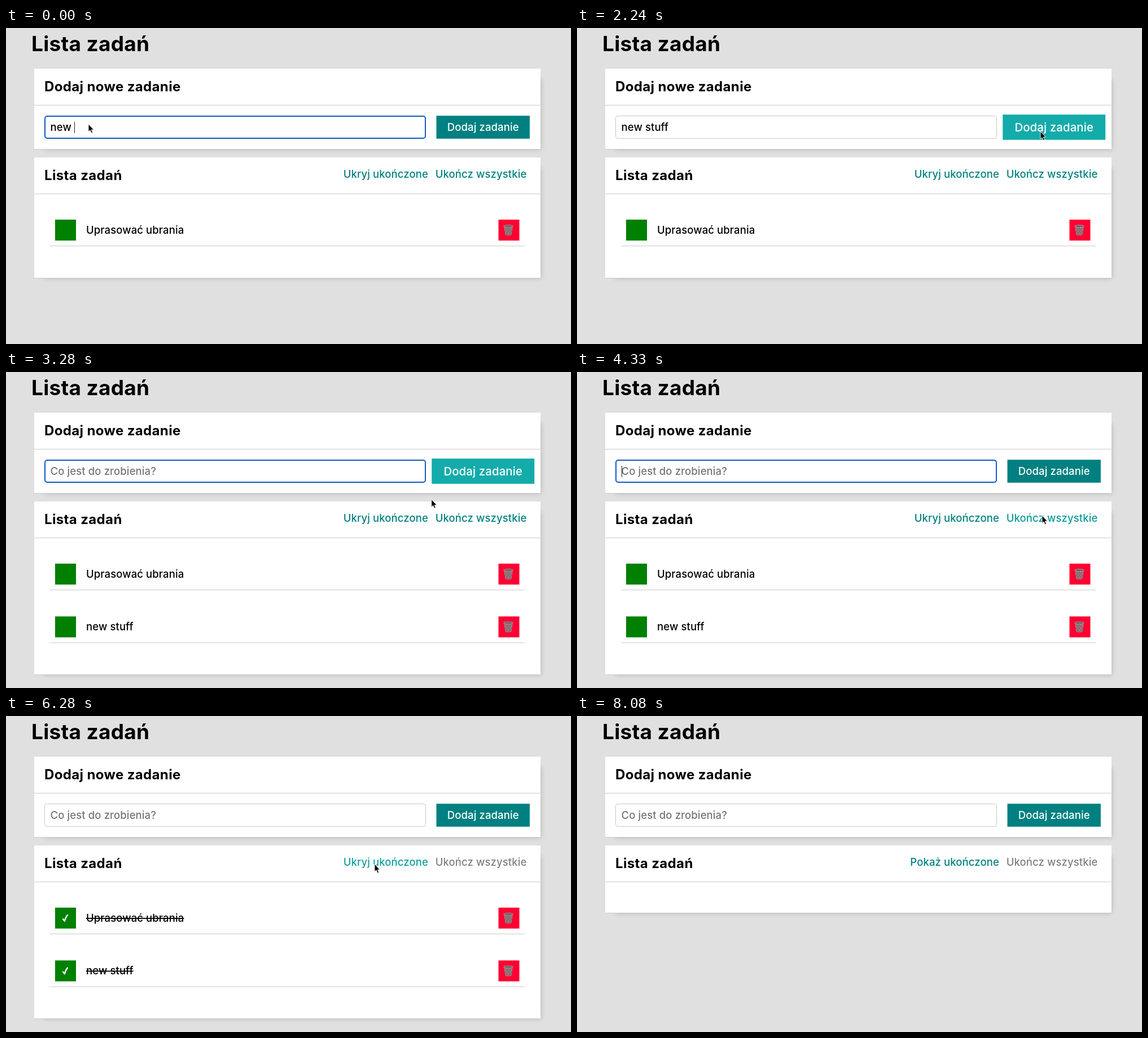
An HTML page for the animation above (8.38 s loop, 1001 px wide and 559 px high).

```html
<!DOCTYPE html>
<html lang="pl">
<head>
<meta charset="utf-8">
<title>Lista zadań</title>
<style>
  html, body { margin: 0; width: 100%; height: 100%; overflow: hidden; background: #e0e0e0; }
  .card {
    position: absolute; left: 50px; width: 896.5px; background: #fff;
    box-shadow: 0 1px 0 #c9c9c9, 9px 9px 9px -9px rgba(0, 0, 0, .22);
  }
  #form { top: 72px; height: 142px; }
  #list { top: 229px; }
  svg { position: absolute; left: 0; top: 0; }
  text { font: 500 18.5px Inter, sans-serif; letter-spacing: .006em; white-space: pre; }
  .title, .heading { font-weight: 700; letter-spacing: .015em; }
  .title { font-size: 37px; letter-spacing: .008em; }
  .heading { font-size: 24px; }
  .link { text-anchor: end; }
  .done { text-decoration: line-through; }
  .rule { stroke: #ccc; }
</style>
</head>
<body>
<div class="card" id="form"></div>
<div class="card" id="list"></div>
<svg width="1001" height="559">
  <defs>
    <g id="trash">
      <rect x="872.5" y="339" width="37" height="37" fill="#ff0033"/>
      <path d="M882 351h16l-2.4 15q-5.600 2.500-11.200 0z" fill="#a5747a"/>
      <path d="M884 353l11 13M888 352l8 9M883 358l7 9M896 353l-11 13M892 352l-8 9M897 358l-7 9"
            stroke="#6d6668" stroke-width=".9"/>
      <ellipse cx="890" cy="350.500" rx="8.500" ry="1.900" fill="#685c5e" stroke="#a69a9b"/>
    </g>
    <path id="check" d="M100.500 358.500l3.300 4.300q1.700-7 5.700-11.300" fill="none"
          stroke="#fff" stroke-width="2.300" stroke-linejoin="round"/>
  </defs>
  <text class="title" x="45" y="41">Lista zadań</text>
  <text class="heading" x="68" y="112">Dodaj nowe zadanie</text>
  <text class="heading" x="68" y="269">Lista zadań</text>
  <path class="rule" d="M50 136.500H946.500M50 293.500H946.500"/>
  <g id="scene"></g>
  <line id="caret" y1="166" y2="186" stroke="#222"/>
  <path id="pointer" d="M0 0v13.500l3-2.700 2.200 5 2.300-1-2.200-4.800h4.200z" stroke="#fff" stroke-width=".9"/>
</svg>
<script>
const LOOP = 8380, STEPS = 56;
const $ = id => document.getElementById(id);
const within = (n, from, to) => n >= from && n < to;

// Pointer moves: first step, last step, start, control and end points
const moves = [
  [6, 14, [146, 170], [480, 70], [821, 183]],
  [20, 23, [821, 183], [776, 212], [730, 240]],
  [23, 27, [730, 240], [760, 262], [824, 254]],
  [35, 42, [824, 254], [740, 282], [653, 262]],
  [47, 54, [653, 262], [700, 440], [965, 580]],
];

function pointerAt(n) {
  const [from, to, a, c, b] = moves.findLast(m => n >= m[0]) || moves[0];
  const u = Math.min(1, Math.max(0, (n - from) / (to - from)));
  const e = u * u * (3 - 2 * u);
  return a.map((v, i) => (1 - e) ** 2 * v + 2 * e * (1 - e) * c[i] + e * e * b[i]);
}

function typedAt(n) {
  if (n >= 16) return '';
  return 'new stuff'.slice(0, n < 5 ? 4 + Math.min(n, 3) : 9);
}

const teal = hover => `rgb(${20 * hover}, ${128 + 43 * hover}, ${128 + 43 * hover})`;

function inputBox(n, focused) {
  const frame = focused
    ? '<rect x="69" y="156" width="674" height="39" rx="4" fill="#fff" stroke="#1059c4" stroke-width="2"/>'
    : '<rect x="68.5" y="155.5" width="675" height="40" rx="4" fill="#fff" stroke="#c8c8c8"/>';
  const typed = typedAt(n);
  return frame + `<text id="entry" x="78.5" y="182" fill="${typed ? '#000' : '#757575'}">${
    typed || 'Co jest do zrobienia?'}</text>`;
}

function button(n) {
  const hover = n === 12 || n === 23 ? .5 : +within(n, 13, 23);
  return `<g transform="translate(845.2 175.5) scale(${1 + hover / 10})">
    <rect x="-82.7" y="-20.3" width="165.400" height="40.600" fill="${teal(hover)}"/>
    <text y="6.500" text-anchor="middle" fill="#fff">Dodaj zadanie</text></g>`;
}

function links(n) {
  const hideHover = n === 45 ? .35 : n === 39 ? .4 : within(n, 40, 49) ? .75 : 0;
  const finishHover = n === 26 ? .3 : within(n, 27, 33) ? .6 : 0;
  return `<text class="link" x="748" y="265" fill="${teal(hideHover)}">${
      n < 45 ? 'Ukryj' : 'Pokaż'} ukończone</text>
    <text class="link" x="922.500" y="265" fill="${n < 33 ? teal(finishHover) : '#808080'}">Ukończ wszystkie</text>`;
}

const task = (name, index, done) => `<g transform="translate(0 ${index * 93.4})">
  <rect x="87" y="339" width="37" height="37" fill="#008000"/>
  ${done ? '<use href="#check"/>' : ''}
  <text class="${done ? 'done' : ''}" x="142" y="364">${name}</text>
  <use href="#trash"/>
  <path class="rule" d="M78 385.500H919"/></g>`;

function draw(n) {
  const focused = n < 15 || within(n, 16, 32);
  const tasks = n >= 45 ? [] : ['Uprasować ubrania', 'new stuff'].slice(0, n < 16 ? 1 : 2);
  $('list').style.height = 119.2 + 93.4 * tasks.length + 'px';
  $('scene').innerHTML = inputBox(n, focused) + button(n) + links(n) +
    tasks.map((name, i) => task(name, i, n >= 33)).join('');

  const blinkOn = n < 9 || within(n, 12, 15) || within(n, 16, 19) || within(n, 23, 26) || within(n, 29, 32);
  const typedWidth = typedAt(n) ? $('entry').getComputedTextLength() : 0;
  const caretX = Math.round(78.5 + typedWidth) + .5;
  $('caret').setAttribute('x1', caretX);
  $('caret').setAttribute('x2', caretX);
  $('caret').style.visibility = focused && blinkOn ? 'visible' : 'hidden';
  $('pointer').setAttribute('transform', `translate(${pointerAt(n)})`);
}

let shown = -1;
function tick() {
  const time = performance.now() % LOOP;
  const step = Math.min(STEPS - 1, Math.floor(time / LOOP * STEPS + .08));
  if (step !== shown) draw(shown = step);
  requestAnimationFrame(tick);
}
tick();
</script>
</body>
</html>
```
